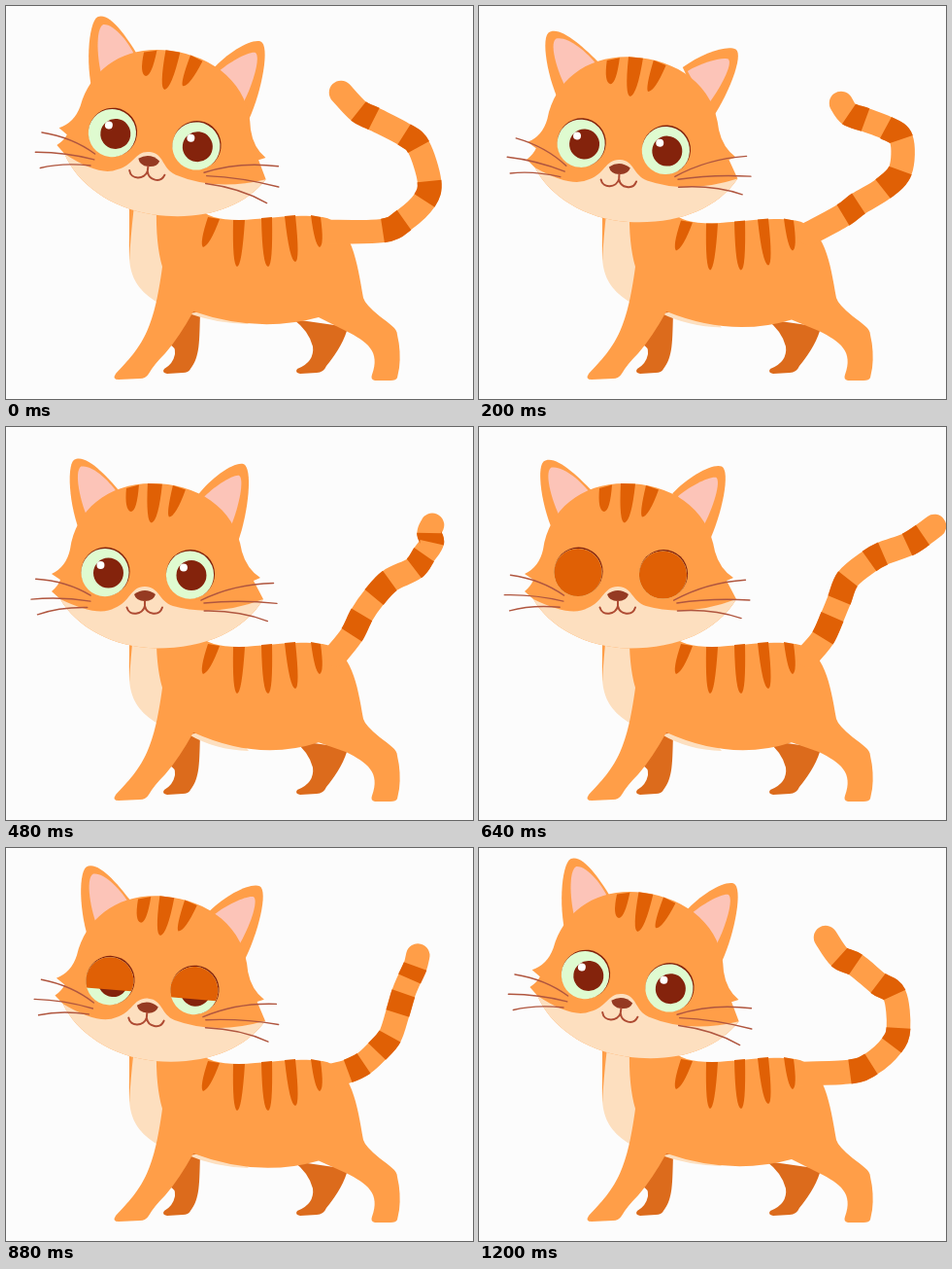
An HTML page with a canvas that plays this animation: 481 by 404 pixels, repeating every 1.24 s.

```html
<!DOCTYPE html>
<html lang="en">
<head>
<meta charset="utf-8">
<title>Cat</title>
<style>
  html, body { margin: 0; width: 100%; height: 100%; overflow: hidden; background: #fcfcfc; }
  canvas { display: block; }
</style>
</head>
<body>
<canvas id="stage" width="481" height="404"></canvas>
<script>
const ctx = document.getElementById('stage').getContext('2d');
const ORANGE = '#ff9e48', DARK = '#e06005', FAR = '#dc6b1c', CREAM = '#fddfbf',
      PINK = '#fcc4b8', GREEN = '#dffbd0', BROWN = '#84230c', LINE = '#b0563f';

const STEPS = 29;
const keys = [0, 4, 8, 15, 19, 24, 28];
const lift = [1, .43, .1, 0, .5, .86, 1];     // head raised and tilted
const flick = [0, 1, 0, .55, 0, 1, 0];        // ears and whiskers
// Centre line of the tail: tip, both ends of four bands, base
const tail = [
  [345,89, 363,108, 379,116, 410,132, 425,145, 436,180, 431,200, 410,220, 388,231, 330,232],
  [373,100, 381,111, 398,117, 419,125, 435,137, 434,169, 416,188, 391,203, 375,215, 340,234],
  [409,101, 413,109, 430,118, 437,132, 433,151, 411,163, 390,177, 372,195, 360,213, 340,234],
  [469,102, 457,111, 441,121, 416,130, 402,138, 380,156, 371,178, 364,195, 354,217, 339,235],
  [441,111, 435,120, 421,131, 405,141, 396,160, 390,181, 381,199, 371,215, 356,227, 338,235],
  [397,106, 400,121, 408,136, 418,158, 418,178, 406,206, 387,219, 368,227, 350,231, 330,232],
  [357,92, 371,112, 388,120, 411,139, 428,151, 432,185, 425,203, 404,222, 382,230, 330,232]
];

// Smooth periodic curve through the keys
function curve(i, value) {
  const n = keys.length;
  const time = k => keys[(k + n) % n] + STEPS * Math.floor(k / n);
  const val = k => value((k + n) % n);
  const slope = k => (val(k + 1) - val(k - 1)) / (time(k + 1) - time(k - 1));
  let k = n - 1;
  while (keys[k] > i) k--;
  const h = time(k + 1) - time(k), u = (i - time(k)) / h, v = 1 - u;
  return val(k) * v * v * (1 + 2 * u) + val(k + 1) * u * u * (3 - 2 * u)
    + h * u * v * (v * slope(k) - u * slope(k + 1));
}

const clamp = x => Math.max(0, Math.min(1, x));

function fill(color, d) {
  ctx.fillStyle = color;
  ctx.fill(new Path2D(d));
}

function stroke(color, width, d) {
  ctx.strokeStyle = color;
  ctx.lineWidth = width;
  ctx.stroke(new Path2D(d));
}

function disc(color, x, y, r) {
  ctx.fillStyle = color;
  ctx.beginPath();
  ctx.arc(x, y, r, 0, 7);
  ctx.fill();
}

function turned(x, y, degrees, draw) {
  ctx.save();
  ctx.translate(x, y);
  ctx.rotate(degrees * Math.PI / 180);
  ctx.translate(-x, -y);
  draw();
  ctx.restore();
}

function drawTail(i) {
  const p = [];
  for (let j = 0; j < 20; j += 2)
    p.push([0, 1].map(c => curve(i, k => tail[k][j + c])));
  const at = j => p[Math.max(0, Math.min(9, j))];
  const handle = (j, s) => [0, 1].map(c => at(j)[c] + s * (at(j + 1)[c] - at(j - 1)[c]) / 6);
  const segment = j => `C${handle(j, 1)} ${handle(j + 1, -1)} ${at(j + 1)}`;
  let line = 'M' + p[0];
  for (let j = 0; j < 9; j++) line += segment(j);
  ctx.lineCap = ctx.lineJoin = 'round';
  stroke(ORANGE, 24.5, line);
  ctx.lineCap = 'butt';
  for (let j = 1; j < 8; j += 2) stroke(DARK, 25, 'M' + p[j] + segment(j));
}

function drawBody(i, d) {
  fill(FAR, 'M168 348L188 312L200 315C199 345 200 360 190 373Q188 377 182 377L166 378Q160 377 163 373Q172 368 174 358Q175 350 168 348Z');
  fill(FAR, 'M296 322L352 330Q348 348 330 370Q327 377 320 377L303 378Q297 377 300 373Q318 366 316 350Q312 334 296 322Z');
  fill(CREAM, `M127 205C128 260 118 283 160 307L170 260L160 205ZM188 316Q215 ${326 + d} 250 ${327 + d}L230 310Z`);
  fill(ORANGE, 'M127 205L132 205Q128 240 127 262Z');
  fill(ORANGE, `M155 205L200 ${208 + d}Q208 ${220 + d} 240 ${220 + d}C270 ${219 + d} 295 ${213 + d} 326 ${217 + d}
    C356 ${222 + d} 362 265 368 300Q370 307 385 319C395 327 403 331 403 338Q407 355 405 372L403 382
    Q402 385 396 385L380 385Q375 384 377 379C386 355 372 345 350 334L322 ${320 + d * .7}
    Q260 ${337 + d * 1.2} 193 314Q178 341 164 357Q152 369 147 378Q144 383 138 383L116 384
    Q109 384 113 378C140 350 152 335 161 268Q154 245 155 205Z`);
  drawTail(i);
  ctx.save();
  ctx.translate(0, d);
  fill(DARK, `M208 217L220 219Q210 246 203 248Q199 244 208 217Z
    M234 220L246 220Q243 267 238 268Q233 266 234 220Z
    M263 218L274 217Q275 267 270 268Q264 267 263 218Z
    M287 216L298 215Q303 262 298 263Q292 262 287 216Z
    M314 215L324 217Q328 246 323 248Q318 246 314 215Z`);
  ctx.restore();
}

function drawEye(x, y, pupilX, pupilY, lid) {
  disc(BROWN, x + .6, y - 1, 25);
  ctx.save();
  ctx.beginPath();
  ctx.arc(x, y, 24.6, 0, 7);
  ctx.clip();
  disc(GREEN, x, y, 26);
  disc(BROWN, pupilX, pupilY, 15.5);
  disc('#fff', pupilX - 8, pupilY - 8, 4);
  ctx.fillStyle = DARK;
  ctx.fillRect(x - 26, y - 26, 52, 52 * lid);
  ctx.restore();
}

function drawHead(e, lid) {
  turned(95, 92, -10 * e, () => {
    fill(ORANGE, 'M80 118C66 90 63 40 72 33C84 26 105 50 122 72Z');
    fill(PINK, 'M86 98C77 78 71 45 79 40C90 38 108 55 118 72Z');
  });
  turned(222, 92, 15.5 * e, () => {
    fill(ORANGE, 'M196 72C210 52 232 35 242 37C252 40 250 85 240 118Z');
    fill(PINK, 'M202 74C212 62 232 48 238 49C244 52 240 80 232 102Z');
  });
  const jaw = 'C245 210 205 227.5 155 227.5C110 227 72 205 56 177Z';
  fill(ORANGE, 'M56 177L47 169Q54 163 56 157L47 151Q62 144 66 126C72 85 105 58 150 58C196 58 236 82 243 128Q248 146 262 155L255 158L265 177' + jaw);
  fill(CREAM, 'M56 177Q95 196 112 186C128 180 128 164 143 164C158 164 157 179 172 184Q215 196 265 177' + jaw);
  fill(DARK, `M124 63Q122 86 129 87Q135 86 137 59.5Z
    M146 58Q144 98 150 98.5Q157 96 161 58.6Z
    M172 60L185 64.5Q175 92 168 92.5Q165 89 172 60Z`);
  drawEye(102, 149.5, 105.5, 150, lid);
  drawEye(189.5, 152, 191, 152.5, lid);
  fill('#953a22', 'M132 172Q143 164 154 172Q152 179 143 179Q134 179 132 172Z');
  ctx.lineCap = 'round';
  stroke('#ae4b33', 2, 'M124.5 185.5C127 195 141 193 143 184V179V184C145 193 158 195 161 185.5');
  turned(86, 178, 11 * e, () =>
    stroke(LINE, 1.4, 'M30 158Q62 159 87 173M26 179Q56 175 87 179M33 194.5Q55 186 84 185.5'));
  turned(204, 183, -7 * e, () =>
    stroke(LINE, 1.4, 'M201 178Q235 162 276 162M204 181Q240 178 279 183M204 189Q240 189 269 201'));
}

function draw(now) {
  const k = Math.floor(now % 1240 / 40);
  const i = k < 2 ? 0 : k < 26 ? k - 1 : k - 2;   // two poses are held twice as long
  const p = curve(i, n => lift[n]);
  const e = clamp(curve(i, n => flick[n]));
  const lid = clamp(Math.min(i - 11, 23 - i) / 3);
  ctx.fillStyle = '#fcfcfc';
  ctx.fillRect(0, 0, 481, 404);
  drawBody(i, 6 * (1 - p));
  ctx.save();
  ctx.translate(4 * p, -14 * p);
  turned(143, 174, 7.2 * p, () => drawHead(e, lid));
  ctx.restore();
}

const start = performance.now();
function tick() {
  draw(performance.now() - start);
  requestAnimationFrame(tick);
}
tick();
</script>
</body>
</html>
```
